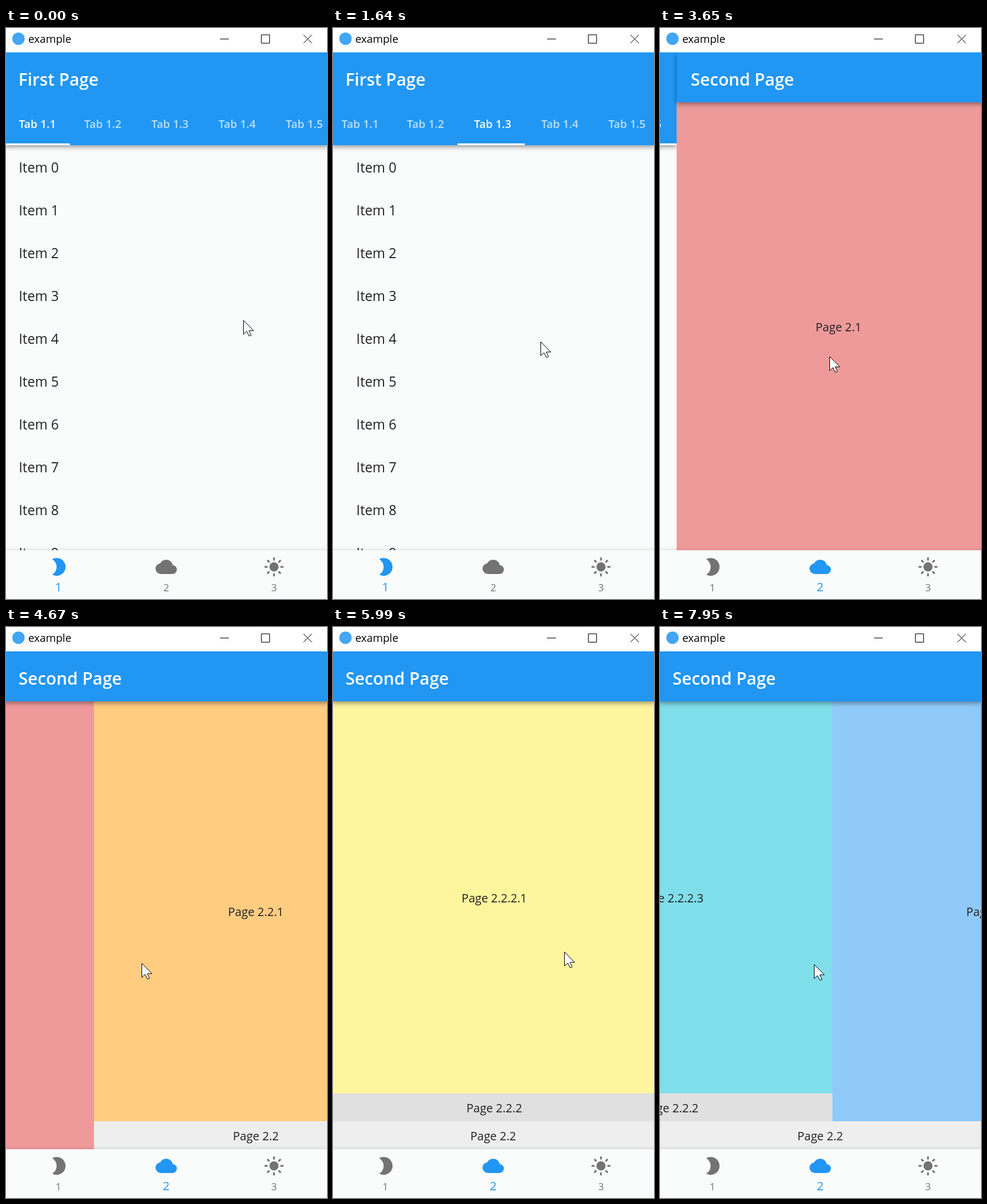
These frames come from a looping animation (540x960 px, 7.99 s). An HTML page with a canvas:

```html
<!DOCTYPE html>
<html lang="en">
<head>
<meta charset="utf-8">
<title>Nested tabs</title>
<style>
html, body { margin: 0; width: 100%; height: 100%; overflow: hidden; background: #fff; }
canvas { display: block; }
</style>
</head>
<body>
<canvas id="stage" width="540" height="960"></canvas>
<script>
const g = document.getElementById('stage').getContext('2d');
const LOOP = 7990, LEFT = -2.5, W = 544, TOP = 41, NAV = 878;
const BLUE = '#2196f3', INK = '#212121', PAPER = '#fafbfb';

// Start of every swipe: four tabs, the second page, then its nested pages
const swipes = [445, 1192, 2011, 2640, 3262, 4457, 5290, 6150, 7005, 7810];
const NAV_SWITCH = 3405;
const DRAG = 0.12, PULL = 190, RATE = 9.08;

const clamp = (v, lo = 0, hi = 1) => Math.max(lo, Math.min(hi, v));
const ease = v => (v = clamp(v), v * v * (3 - 2 * v));
const mix = (a, b, k) => a + (b - a) * k;

// Drag with growing speed, then a spring settling on the next page
function swiped(start, t) {
  const s = (t - start) / 1000;
  if (s <= 0) return 0;
  if (s < DRAG) return PULL / W * (s / DRAG) ** 2;
  return 1 - (1 - PULL / W) * Math.exp(-RATE * (s - DRAG));
}

function rect(x, y, w, h, color) {
  g.fillStyle = color;
  g.fillRect(x, y, w, h);
}

function text(str, x, y, size, color, weight = 400, align = 'left') {
  g.font = `${weight} ${size}px "Open Sans", "Noto Sans", sans-serif`;
  g.textAlign = align;
  g.fillStyle = color;
  g.fillText(str, x, y);
}

function disc(x, y, r) {
  g.beginPath();
  g.arc(x, y, r, 0, 7);
  g.fill();
}

function raised(x, y, w, h, color, alpha, blur, drop) {
  g.save();
  g.shadowColor = `rgba(0,0,0,${alpha})`;
  g.shadowBlur = blur;
  g.shadowOffsetY = drop;
  rect(x, y, w, h, color);
  g.restore();
}

function appBar(x, height, title) {
  raised(Math.round(x), TOP, W, height, BLUE, 0.4, 8, 3);
  text(title, x + 23.5, 97, 28.6, '#fff', 600);
}

const tabEdge = i => Math.max(0, 113 * i - 3);
const tabScroll = i => clamp((tabEdge(i) + tabEdge(i + 1) - W) / 2, 0, 17.5);

function between(rule, v) {
  const i = Math.floor(v);
  return mix(rule(i), rule(i + 1), v - i);
}

function firstPage(x, tab) {
  rect(x, TOP, W, NAV - TOP, PAPER);
  for (let p = 0; p < 5; p++) {
    const left = x + (p - tab) * W;
    for (let i = 0; i < 10; i++) text('Item ' + i, left + 24, 243 + 72 * i, 22.8, INK);
  }
  appBar(x, 156, 'First Page');
  const bar = x - between(tabScroll, tab);
  for (let i = 0; i < 5; i++) {
    const alpha = 0.7 + 0.3 * clamp(1 - Math.abs(tab - i));
    text('Tab 1.' + (i + 1), bar + tabEdge(i) + 24, 168, 18.6, `rgba(255,255,255,${alpha})`, 600);
  }
  const start = between(tabEdge, tab), end = between(tabEdge, tab + 1);
  rect(bar + start, 194, end - start, 3, '#fff');
}

// A coloured block with its name in the middle
function panel(x, top, bottom, color, name) {
  rect(Math.round(x), top, W, bottom - top, color);
  text(name, x + W / 2, (top + bottom) / 2 + 8, 19.6, INK, 400, 'center');
}

function secondPage(x, outer, middle, inner) {
  const x2 = x + (1 - outer) * W;
  const x22 = x2 + (1 - middle) * W;
  panel(x2 - W, 125, NAV, '#ef9a9a', 'Page 2.1');
  panel(x22 - W, 125, 831, '#ffcc80', 'Page 2.2.1');
  ['#fff59d', '#a5d6a7', '#80deea'].forEach((color, i) =>
    panel(x22 + (i - inner) * W, 125, 784, color, 'Page 2.2.2.' + (i + 1)));
  panel(x22, 784, 831, '#e0e0e0', 'Page 2.2.2');
  panel(x22 + W, 125, 831, '#90caf9', 'Page 2.2.3');
  panel(x2, 831, NAV, '#eeeeee', 'Page 2.2');
  appBar(x, 84, 'Second Page');
}

// Icons live in a 24 unit box
function moon() {
  const a = Math.PI / 3;
  g.beginPath();
  g.arc(10, 12, 10, -2 * a, 2 * a);
  g.arc(0, 12, 10, a, -a, true);
  g.fill();
}

function cloud() {
  disc(6, 14, 6);
  disc(12, 11.5, 7.5);
  disc(19, 15, 5);
  g.fillRect(6, 14, 13, 6);
}

function sun() {
  disc(12, 12, 5.1);
  g.lineWidth = 2;
  g.lineCap = 'round';
  g.beginPath();
  for (let i = 0; i < 8; i++) {
    const c = Math.cos(i * Math.PI / 4), s = Math.sin(i * Math.PI / 4);
    g.moveTo(12 + 8 * c, 12 + 8 * s);
    g.lineTo(12 + 9.8 * c, 12 + 9.8 * s);
  }
  g.stroke();
}

function navBar(k) {
  raised(-10, NAV, 560, 100, PAPER, 0.16, 6, 0);
  const active = [1 - k, k, 0];
  [moon, cloud, sun].forEach((icon, i) => {
    const on = active[i], cx = LEFT + W * (2 * i + 1) / 6;
    const color = `rgb(${mix(115, 33, on)},${mix(115, 150, on)},${mix(115, 243, on)})`;
    g.save();
    g.translate(cx - 18, 888);
    g.scale(1.5, 1.5);
    g.fillStyle = g.strokeStyle = color;
    icon();
    g.restore();
    text(i + 1, cx, 947, mix(17, 20, on), color, 400, 'center');
  });
}

function titleBar() {
  rect(0, 0, 540, TOP, '#fff');
  g.fillStyle = '#42a5f5';
  disc(21, 18, 10.5);
  text('example', 37.5, 25, 18.2, '#000');
  g.strokeStyle = '#000';
  g.lineWidth = 1;
  g.stroke(new Path2D('M360 18.5H375M429.5 11.5h14v14h-14zM500.5 11.5l14 14M514.5 11.5l-14 14'));
}

// The hand pulls left, waits and returns, slower on the nested pages
function pulled(start, i, t) {
  const s = t - start;
  return ease(s / 190) - ease((s - 295) / (i < 5 ? 260 : 540));
}

function pointer(t) {
  const pull = swipes.reduce((sum, start, i) => sum + pulled(start, i, t), 0);
  const x = 399 + 10 * ease((t - 30) / 230) + 9 * ease((t - 445) / 1000) - 190 * pull;
  const y = 548 - 57 * Math.exp(-t / 2600) + 26 * pull;
  const arrow = new Path2D('M0 0V23.5L5.5 18.5 9.5 26.5 13 25 9.3 17.3H17z');
  g.save();
  g.translate(Math.round(x) + 0.5, Math.round(y) + 0.5);
  g.fillStyle = '#fff';
  g.strokeStyle = '#000';
  g.fill(arrow);
  g.stroke(arrow);
  g.restore();
}

function draw(t) {
  const s = swipes.map(start => swiped(start, t));
  const x = LEFT - s[4] * W;
  rect(0, 0, 540, 960, PAPER);
  firstPage(x, s[0] + s[1] + s[2] + s[3]);
  if (s[4] > 0) secondPage(x + W, s[5], s[6] + s[9], s[7] + s[8]);
  navBar(ease((t - NAV_SWITCH) / 200));
  titleBar();
  pointer(t);
}

function frame() {
  draw(performance.now() % LOOP);
  requestAnimationFrame(frame);
}
frame();
</script>
</body>
</html>
```
